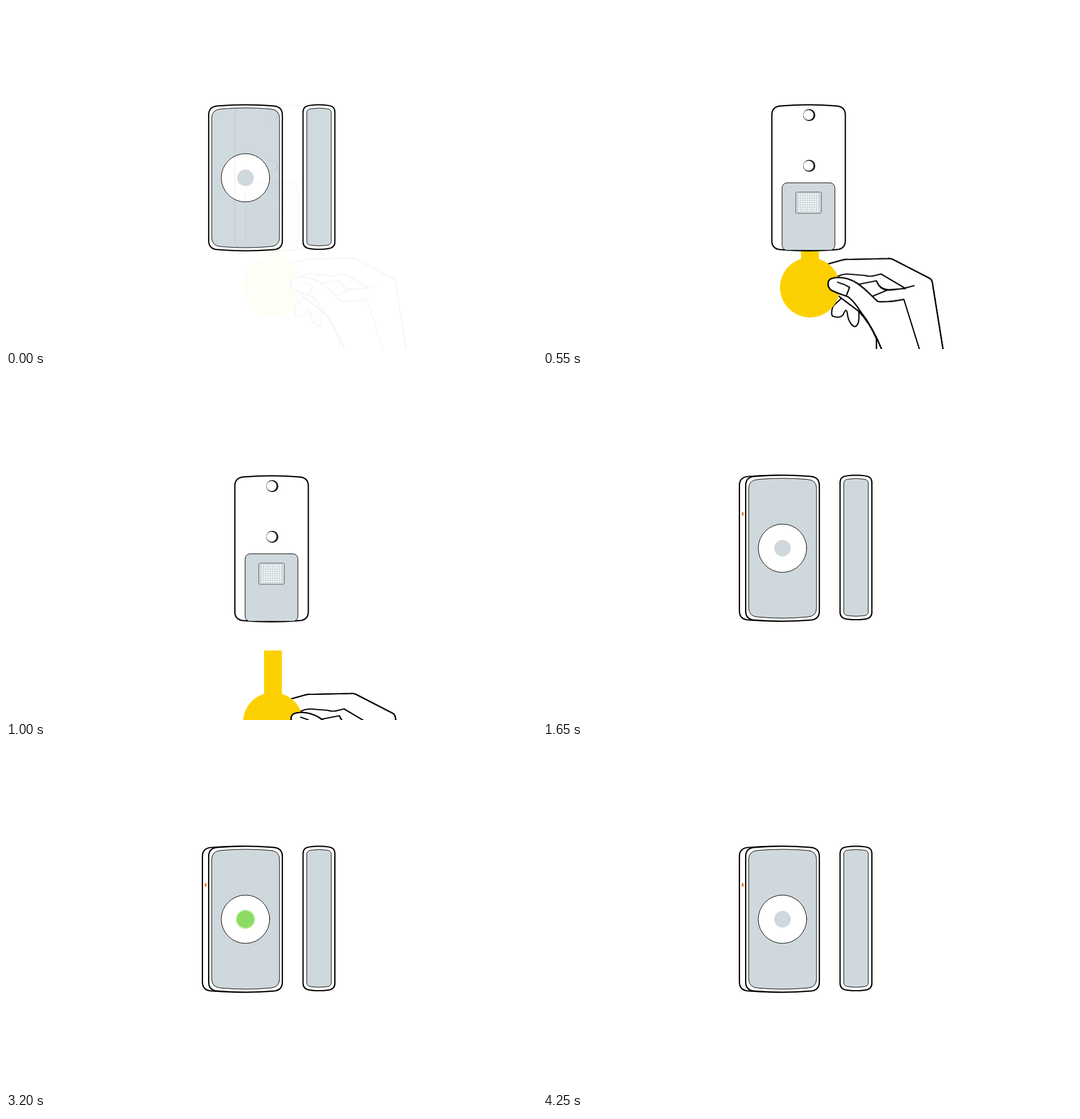
An HTML page that plays this animation: 930x602 px, repeating every 4.72 s.

```html
<!DOCTYPE html>
<html lang="en">
<head>
<meta charset="utf-8">
<title>Sensor setup</title>
<style>
  html, body { margin: 0; width: 100%; height: 100%; overflow: hidden; background: #fff; }
  svg { display: block; width: 100vw; height: 100vh; }
  .line { fill: #fff; stroke: #000; stroke-width: 2.2; stroke-linejoin: round; stroke-linecap: round; }
  .open { fill: none; }
  .panel { fill: #cfd8dd; stroke: #000; stroke-width: 1; }
  .thin { stroke-width: 1; }
  .grey { fill: #cfd8dd; }
  .yellow { fill: #fcd000; }
  .blue { stroke: #00a0e9; fill: none; }
  text { font: 300 35px Inter, "Open Sans", sans-serif; fill: #00a0e9; text-anchor: middle; }
  #back, #angled, #tool, #unit, #zero, #one, #glow { opacity: 0; }
</style>
</head>
<body>
<svg viewBox="0 0 930 602">
  <defs>
    <radialGradient id="green">
      <stop offset=".8" stop-color="#84dc54"/>
      <stop offset=".86" stop-color="#84dc54" stop-opacity=".65"/>
      <stop offset="1" stop-color="#84dc54" stop-opacity="0"/>
    </radialGradient>
    <pattern id="dots" width="4" height="4" x="447" y="329" patternUnits="userSpaceOnUse">
      <circle cx="2" cy="2" r="1.35" fill="#fff"/>
    </pattern>
    <g id="hole">
      <circle cx="466.4" cy="191.5" r="10.6" fill="#231815"/>
      <circle cx="465" cy="191.2" r="8.8" fill="#fff"/>
    </g>
    <g id="devices">
      <path class="line" data-body="355,173.3,484,429.7,16,2"/>
      <path class="panel" data-body="360.3,178.8,479,424.2,16,2"/>
      <circle class="line thin" cx="419.4" cy="301.5" r="42.4"/>
      <circle class="grey" cx="419.4" cy="301.5" r="14.5"/>
      <path class="line" data-body="520.3,173.3,576,427,12,1.2"/>
      <path class="panel" data-body="526.8,179.2,569.7,421,7,1.2"/>
    </g>
  </defs>

  <rect width="930" height="602" fill="#fff"/>
  <use href="#devices"/>

  <g id="back">
    <rect width="930" height="602" fill="#fff"/>
    <g id="pull">
      <path class="line" d="M508 526C505 534 504 543 509 544C517 547 525 545 527 538Q531 529 533 538C534 551 540 560 546 562C554 560 554 546 553 535L530 505Z"/>
      <path class="line" d="M499 452L524 445Q529 443.500 534 444L604 442.500Q609 442 613 444L677 477Q681 479 682 485L701 604H584V583Q572 555 553 535L500 495Z" stroke="none"/>
      <path class="line open" d="M499 452L524 445Q529 443.500 534 444L604 442.500Q609 442 613 444L677 477Q681 479 682 485L701 604M584 604V583Q572 555 553 535"/>
      <path class="line open" d="M516 473.500Q524 470 532 469.500L563 472Q573 475 582 472L592 469.500L635 495M553 487.500L584 481.500Q589 496 602 498Q622 498 650 490M584 481.500L588 489Q595 497 606 497L635 495M576 509L604 497.500"/>
      <path class="yellow" d="M452 367H483.200V460H452Z"/>
      <circle class="yellow" cx="467.600" cy="493.200" r="52.500"/>
      <path class="line" d="M632 514Q610 519 587 518C580 514 569 498 549 485C535 476 515 473 504 478C497 482 498 493 505 498C514 503 526 506 535 510Q546 519 555 534C574 558 585 581 594 604H660Z" stroke="none"/>
      <path class="line open" d="M632 514Q610 519 587 518C580 514 569 498 549 485C535 476 515 473 504 478C497 482 498 493 505 498C514 503 526 506 535 510Q546 519 555 534C574 558 585 581 594 604M516 484Q527 487 537 493L531 508"/>
    </g>
    <path class="line" data-body="400.8,173.300,529.500,429.700,16,2"/>
    <use href="#hole"/>
    <use href="#hole" y="89"/>
    <rect class="panel" x="418.800" y="310.300" width="92.400" height="118.500" rx="9"/>
    <rect x="442.600" y="326.500" width="45" height="37.500" rx="3" fill="#cfd8dd" stroke="#555" stroke-width=".9"/>
    <rect x="447" y="329" width="36" height="32" fill="url(#dots)"/>
  </g>

  <g id="angled">
    <rect width="930" height="602" fill="#fff"/>
    <path class="line" data-body="344,172.500,473,428.500,16,2"/>
    <ellipse cx="349.700" cy="240.300" rx="1.600" ry="3.200" fill="#f76b0c"/>
    <use href="#devices" y="-1"/>
    <circle id="glow" cx="419.400" cy="300.700" r="18" fill="url(#green)"/>
    <g id="tool" class="blue">
      <path d="M254 149L302.200 196.500" stroke-width="43" stroke-linecap="round"/>
      <path d="M312 206L347.500 240.500" stroke-width="6.500"/>
    </g>
    <text id="zero" x="289.500" y="285.500">0</text>
    <text id="one" x="288.500" y="285.500">1</text>
    <text id="unit" x="311.500" y="285.500">S</text>
  </g>
</svg>
<script>
  const LOOP = 4720;
  const SOFT = 'cubic-bezier(.3,.15,.7,.85)';

  // Rounded box whose top and bottom edges bulge slightly outwards.
  function bodyPath(left, top, right, bottom, r, bulge) {
    const mid = (left + right) / 2, hi = top + bulge, lo = bottom - bulge;
    return `M${left} ${hi + r}Q${left} ${hi + 1} ${left + r} ${hi}
      Q${mid} ${top - bulge} ${right - r} ${hi}Q${right} ${hi + 1} ${right} ${hi + r}
      V${lo - r}Q${right} ${lo - 1} ${right - r} ${lo}
      Q${mid} ${bottom + bulge} ${left + r} ${lo}Q${left} ${lo - 1} ${left} ${lo - r}Z`;
  }
  for (const el of document.querySelectorAll('[data-body]'))
    el.setAttribute('d', bodyPath(...el.dataset.body.split(',').map(Number)));

  // Steps are [time in ms, value, easing]; the ends are held.
  function play(id, prop, steps) {
    const all = [[0, steps[0][1]], ...steps, [LOOP, steps.at(-1)[1]]];
    const frames = all.map(([ms, value, easing = 'linear']) =>
      ({ offset: ms / LOOP, [prop]: value, easing }));
    document.getElementById(id).animate(frames, { duration: LOOP, iterations: Infinity });
  }
  const show = (id, from, to) =>
    play(id, 'opacity', [[from, 0], [from, 1], [to, 1], [to, 0]]);

  play('back', 'opacity', [[5, 0], [310, 1]]);
  play('pull', 'transform', [[545, 'translate(0px,0px)', SOFT], [1000, 'translate(0px,113px)']]);
  play('pull', 'opacity', [[1070, 1], [1070, 0]]);
  play('angled', 'opacity', [[1110, 0], [1650, 1]]);

  show('tool', 1750, 2960);
  play('tool', 'transform', [[1750, 'translate(-49px,-34px)', SOFT], [2020, 'translate(0px,0px)']]);
  show('zero', 2020, 2490);
  show('one', 2490, 2960);
  show('unit', 2020, 2960);

  const BLINK = 430, blinks = [];
  for (let start = 2960; start < 4250; start += BLINK)
    blinks.push([start, 0], [start + BLINK / 2, 1], [start + BLINK, 0]);
  play('glow', 'opacity', blinks);
</script>
</body>
</html>
```
